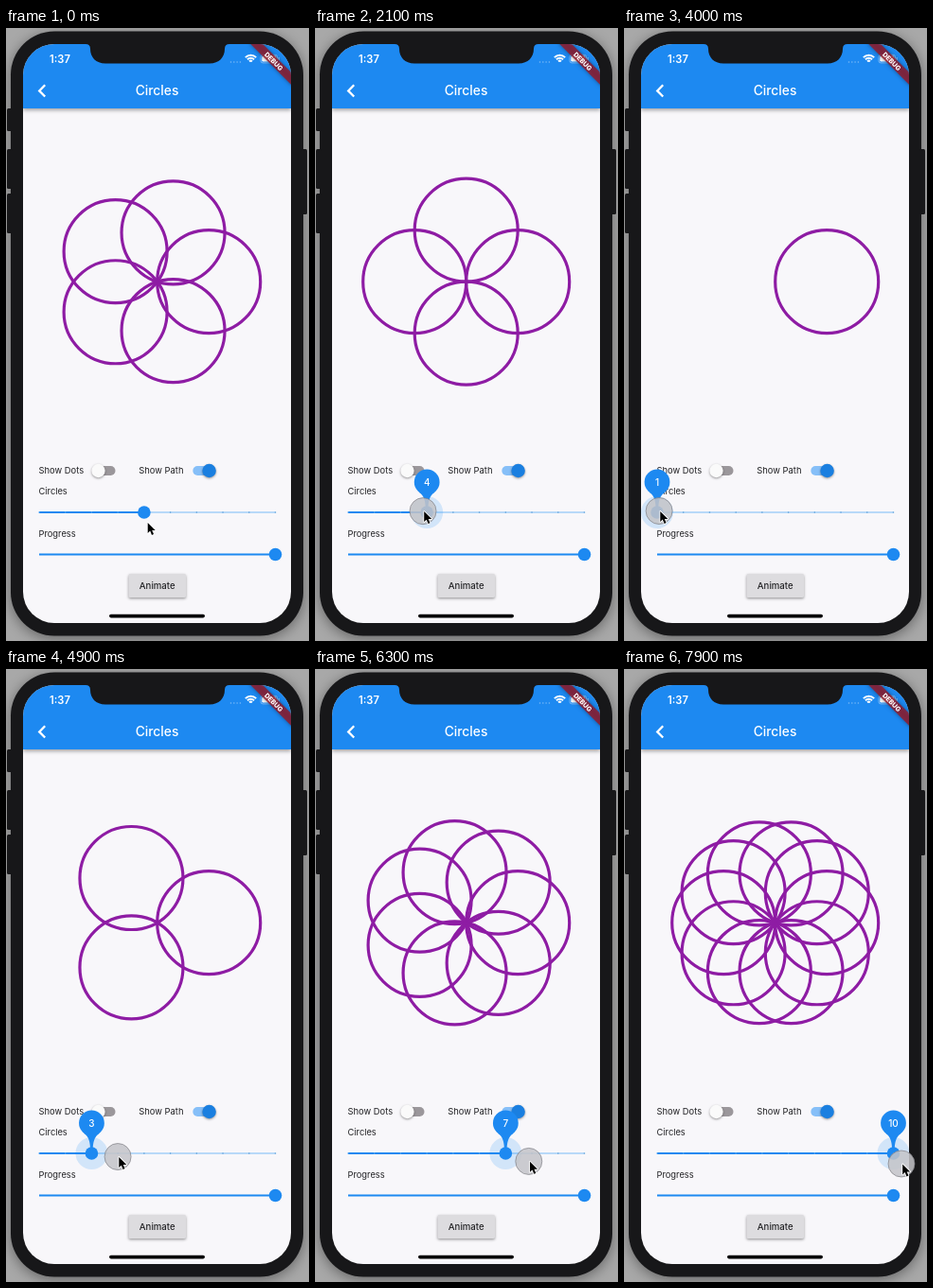
Animation of 320 by 648 pixels, one loop 8000 ms. Source, as an HTML page with a canvas:

```html
<!DOCTYPE html>
<html lang="en">
<head>
<meta charset="utf-8">
<title>Circles</title>
<style>
  html, body { margin: 0; width: 100%; height: 100%; overflow: hidden; background: #a8a8a8; }
  canvas { display: block; width: 320px; height: 648px; }
</style>
</head>
<body>
<canvas id="stage"></canvas>
<script>
const canvas = document.getElementById('stage');
const ctx = canvas.getContext('2d');
const ratio = window.devicePixelRatio || 1;
canvas.width = 320 * ratio;
canvas.height = 648 * ratio;

const LOOP = 8000, PRESS = 900, LAG = 190, SNAP = 75;
const BLUE = '#1d89f1', PURPLE = '#8e1ca4', PAPER = '#f8f7fa';
const TRACK = { left: 35, right: 284.5, y: 512 };
const STEP = (TRACK.right - TRACK.left) / 9;

// Pointer path: time, x, y
const PATH = [
  [0, 148.5, 522.5], [500, 148.5, 522.5], [850, 149, 514], [1400, 159.7, 515],
  [2700, 75, 507], [3700, 36, 510], [4000, 37, 510.5], [5700, 190, 520],
  [6800, 255.5, 520.8], [7900, 293, 523], [8000, 293.5, 523]
];

const clamp01 = v => Math.max(0, Math.min(1, v));

function pointer(t) {
  t = Math.max(0, Math.min(LOOP, t));
  const i = Math.max(1, PATH.findIndex(p => p[0] >= t));
  const [t0, x0, y0] = PATH[i - 1], [t1, x1, y1] = PATH[i];
  const k = (t - t0) / (t1 - t0);
  return { x: x0 + (x1 - x0) * k, y: y0 + (y1 - y0) * k };
}

function countAt(t) {
  if (t < PRESS + LAG) return 5;
  const step = Math.round((pointer(t - LAG).x - TRACK.left) / STEP);
  return Math.max(1, Math.min(10, step + 1));
}

// The thumb slides linearly to each new step.
function thumbX(t) {
  const samples = 25;
  let sum = 0;
  for (let i = 0; i < samples; i++) sum += countAt(t - SNAP * (i + 0.5) / samples);
  return TRACK.left + (sum / samples - 1) * STEP;
}

function box(x, y, w, h, r, fill) {
  ctx.beginPath();
  ctx.roundRect(x, y, w, h, r);
  ctx.fillStyle = fill;
  ctx.fill();
}

function disc(x, y, r, fill) {
  ctx.beginPath();
  ctx.arc(x, y, r, 0, Math.PI * 2);
  ctx.fillStyle = fill;
  ctx.fill();
}

function line(points, color, width) {
  ctx.beginPath();
  points.forEach(([x, y]) => ctx.lineTo(x, y));
  ctx.strokeStyle = color;
  ctx.lineWidth = width;
  ctx.stroke();
}

function text(str, x, y, size, color, weight = 400, align = 'left') {
  ctx.font = `${weight} ${size}px Inter, sans-serif`;
  ctx.textAlign = align;
  ctx.textBaseline = 'alphabetic';
  ctx.fillStyle = color;
  ctx.fillText(str, x, y);
}

function withShadow(color, blur, dy, draw) {
  ctx.save();
  ctx.shadowColor = color;
  ctx.shadowBlur = blur * ratio;
  ctx.shadowOffsetY = dy * ratio;
  draw();
  ctx.restore();
}

function drawPhone() {
  ctx.fillStyle = '#a8a8a8';
  ctx.fillRect(0, 0, 320, 648);
  withShadow('rgba(0,0,0,.4)', 14, 3, () => box(5, 3.5, 309, 639, 46, '#171719'));
  for (const [y, h] of [[85, 24], [128, 42], [175, 42]]) box(1, y, 6, h, 1.5, '#171719');
  box(312, 128, 6, 69, 1.5, '#171719');
}

function drawNotch() {
  ctx.beginPath();
  ctx.moveTo(84, 16);
  ctx.lineTo(84, 17);
  ctx.quadraticCurveTo(89, 17, 89, 22);
  ctx.bezierCurveTo(89, 31, 95, 37.5, 105, 37.5);
  ctx.lineTo(215, 37.5);
  ctx.bezierCurveTo(225, 37.5, 231, 31, 231, 22);
  ctx.quadraticCurveTo(231, 17, 236, 17);
  ctx.lineTo(236, 16);
  ctx.fillStyle = '#171719';
  ctx.fill();
}

function drawStatus() {
  text('1:37', 46, 37, 11.2, '#fff', 600);
  for (let i = 0; i < 4; i++) disc(237.5 + i * 3.3, 36, 0.8, 'rgba(255,255,255,.4)');
  ctx.lineCap = 'butt';
  for (const r of [2, 5, 8]) {
    ctx.beginPath();
    ctx.arc(258.5, 36.8, r, -Math.PI * 0.75, -Math.PI * 0.25);
    ctx.strokeStyle = '#fff';
    ctx.lineWidth = 2;
    ctx.stroke();
  }
  ctx.beginPath();
  ctx.roundRect(269, 28.3, 17.5, 8.6, 2.3);
  ctx.strokeStyle = 'rgba(255,255,255,.5)';
  ctx.lineWidth = 0.8;
  ctx.stroke();
  box(270.3, 29.6, 15, 6, 1.3, '#fff');
  box(287.5, 31, 1.2, 3, 0.6, 'rgba(255,255,255,.5)');
}

function drawBanner() {
  ctx.save();
  ctx.translate(301, 17);
  ctx.rotate(Math.PI / 4);
  withShadow('rgba(0,0,0,.5)', 4, 0, () => box(-32, 21.1, 64, 9.1, 0, 'rgba(150,24,40,.8)'));
  text('DEBUG', 0, 28.3, 7, '#fff', 800, 'center');
  ctx.restore();
}

function drawBar() {
  withShadow('rgba(0,0,0,.35)', 4, 1.5, () => box(18, 17, 283, 68, 0, BLUE));
  drawStatus();
  ctx.lineCap = 'butt';
  ctx.lineJoin = 'miter';
  line([[41.2, 60.3], [35.2, 66.4], [41.2, 72.5]], '#fff', 2.3);
  text('Circles', 159.5, 71, 13.8, '#fff', 500, 'center');
}

function drawRings(n) {
  const r = 54.5;
  ctx.strokeStyle = PURPLE;
  ctx.lineWidth = 3.2;
  for (let i = 0; i < n; i++) {
    const a = i * Math.PI * 2 / n;
    ctx.beginPath();
    ctx.arc(159.7 + r * Math.cos(a), 268.2 + r * Math.sin(a), r, 0, Math.PI * 2);
    ctx.stroke();
  }
}

function drawSwitch(x, on) {
  box(x, 463, 22, 10, 5, on ? '#86bff8' : '#9b979b');
  const cx = on ? x + 17.3 : x + 4;
  withShadow('rgba(0,0,0,.4)', 2.5, 1, () => disc(cx, 468, 7.2, on ? '#1a7fe0' : '#fafafa'));
}

function drawControls() {
  const ink = '#222225';
  text('Show Dots', 34.5, 471.2, 9.4, ink);
  text('Show Path', 140.3, 471.2, 9.4, ink);
  text('Circles', 34.5, 493.4, 9.3, ink);
  text('Progress', 34.5, 537.8, 9.3, ink);
  drawSwitch(93.5, false);
  drawSwitch(197.3, true);
  line([[TRACK.left, 556.5], [TRACK.right, 556.5]], BLUE, 1.8);
  disc(TRACK.right, 556.5, 6.8, BLUE);
  withShadow('rgba(0,0,0,.4)', 3, 1.3, () => box(129.5, 577, 60.5, 25, 1.6, '#dddcdf'));
  text('Animate', 159.7, 593, 9.6, ink, 500, 'center');
  box(109, 619.8, 101, 3.6, 1.8, '#050505');
}

function drawSlider(x, grow) {
  const { left, right, y } = TRACK;
  line([[left, y], [right, y]], '#a3cff7', 1.5);
  line([[left, y], [x, y]], BLUE, 1.8);
  for (let i = 0; i < 10; i++) {
    const tx = left + i * STEP;
    disc(tx, y, 0.8, tx < x ? '#63aef4' : '#5f9fd8');
  }
  disc(x, y, 17 * grow, 'rgba(29,137,241,.17)');
  disc(x, y, 6.8, BLUE);
}

function drawBubble(x, n, grow) {
  if (!grow) return;
  ctx.save();
  ctx.translate(x, TRACK.y);
  ctx.scale(grow, grow);
  ctx.beginPath();
  ctx.moveTo(-1.2, 0);
  ctx.bezierCurveTo(-1.2, -15, -4, -18, -8.5, -21.5);
  ctx.lineTo(8.5, -21.5);
  ctx.bezierCurveTo(4, -18, 1.2, -15, 1.2, 0);
  ctx.fillStyle = BLUE;
  ctx.fill();
  disc(0, -32, 13.4, BLUE);
  text(String(n), 0, -28.3, 10, '#fff', 500, 'center');
  ctx.restore();
}

function drawPointer({ x, y }, pressed) {
  if (pressed) {
    disc(x, y, 14, 'rgba(196,196,200,.86)');
    ctx.strokeStyle = 'rgba(125,125,130,.75)';
    ctx.lineWidth = 0.9;
    ctx.stroke();
  }
  ctx.save();
  ctx.translate(x + 1.2, y + 0.4);
  ctx.beginPath();
  [[0, 0], [0, 11], [2.5, 8.7], [4.3, 13], [6.3, 12.1], [4.5, 8], [8, 8]]
    .forEach(([px, py]) => ctx.lineTo(px, py));
  ctx.closePath();
  ctx.lineJoin = 'round';
  ctx.strokeStyle = '#fff';
  ctx.lineWidth = 1.6;
  ctx.stroke();
  ctx.fillStyle = '#000';
  ctx.fill();
  ctx.restore();
}

function render(t) {
  const n = countAt(t), x = thumbX(t), grow = clamp01((t - PRESS) / 100);
  ctx.setTransform(ratio, 0, 0, ratio, 0, 0);
  drawPhone();
  ctx.save();
  ctx.beginPath();
  ctx.roundRect(18, 17, 283, 612, 33);
  ctx.clip();
  box(18, 17, 283, 612, 0, PAPER);
  drawBar();
  drawRings(n);
  drawControls();
  drawSlider(x, grow);
  drawBubble(x, n, grow);
  drawBanner();
  ctx.restore();
  drawNotch();
  drawPointer(pointer(t), t >= PRESS);
}

const start = performance.now();
function tick() {
  render((performance.now() - start) % LOOP);
  requestAnimationFrame(tick);
}
tick();
</script>
</body>
</html>
```
